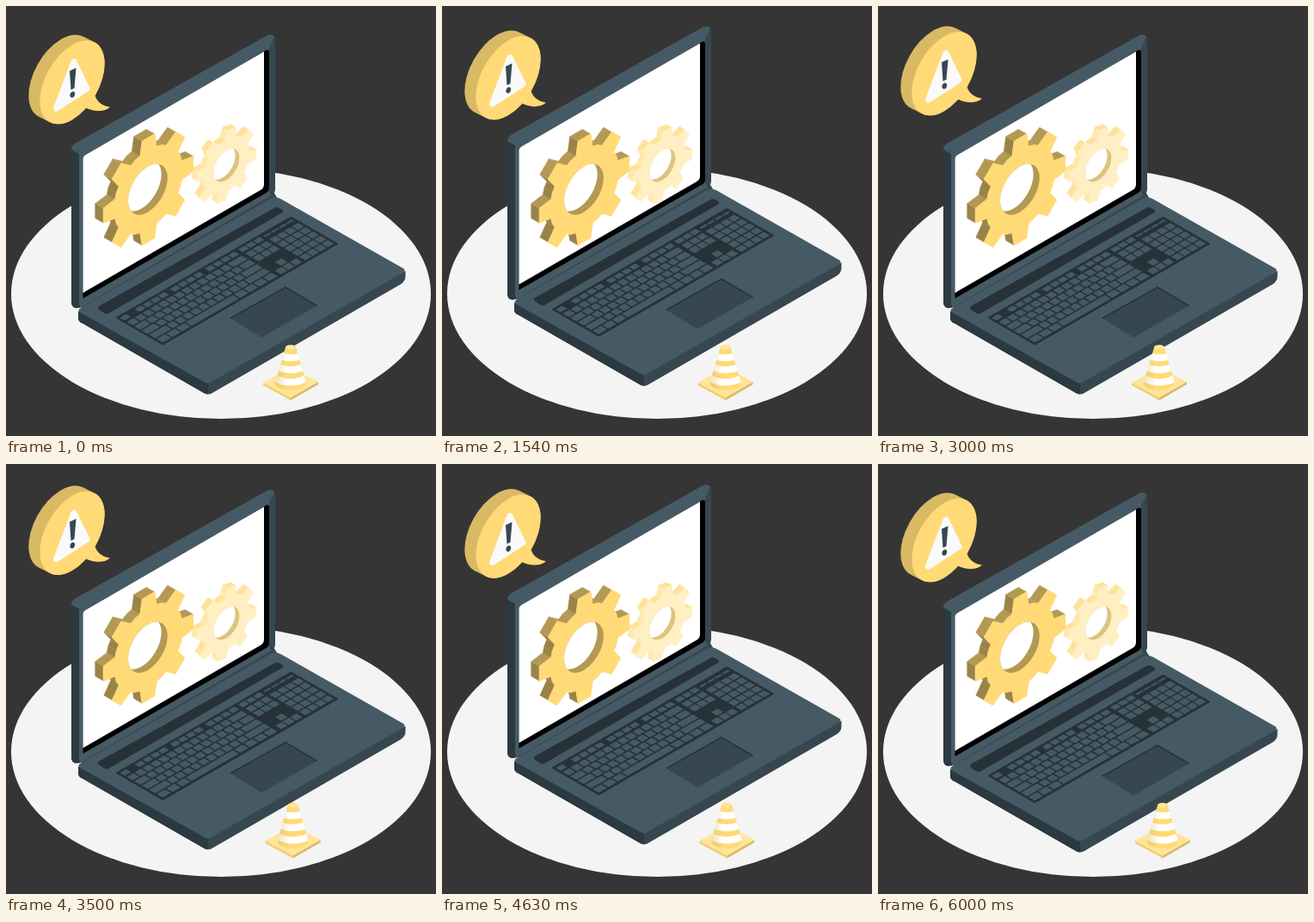
An HTML page for the animation above (6.04 s loop, 500x500 px).

```html
<!DOCTYPE html>
<html lang="en">
<head>
<meta charset="utf-8">
<title>Laptop maintenance</title>
<style>
html, body { margin: 0; width: 100%; height: 100%; overflow: hidden; background: #353535; }
svg { display: block; width: 100%; height: 100%; }
</style>
</head>
<body>
<svg viewBox="0 0 500 500">
  <defs>
    <linearGradient id="shade">
      <stop offset="0" stop-color="#d9b964" stop-opacity=".55"/>
      <stop offset=".4" stop-color="#d9b964" stop-opacity="0"/>
    </linearGradient>
    <clipPath id="coneClip">
      <path d="M325 397C325 393 337 393 337 397L349 438C349 450 313 450 313 438Z"/>
    </clipPath>
  </defs>

  <ellipse cx="250" cy="334.500" rx="244" ry="145.500" fill="#f4f4f4"/>

  <g id="laptop">
    <!-- lid -->
    <path d="M86 346L311 216L317 226L90 356Z" fill="#37474f"/>
    <path d="M76 167Q76 163 80 160L303 34.500Q313 30 313 40V213Q313 218 308 221L88 350Q76 354 76 344Z" fill="#37474f"/>
    <path d="M76 167Q76 163 80 160L303 34.500Q309 32 312 36L306 48V216L309 220L88 350Q85 350 85 346V172Z" fill="#455a64"/>
    <path d="M76 167L85 172V346Q85 350 88 350Q76 354 76 344Z" fill="#2b3940"/>
    <path d="M89.500 178V340L303 217Q306 215 306 211V54Q306 49 301 52Z" fill="#000"/>
    <path d="M89.500 178Q89.500 175 92 173.500L300 53V207Q300 212 296 214L89.500 333.500Z" fill="#fff"/>
    <!-- base -->
    <path d="M84 355V363Q84 367 89 369L231 450.500Q235 452.500 239 450.500L459 323.500Q464.500 320 464.500 314V308L235 400Z" fill="#37474f"/>
    <path d="M84 355V363Q84 367 89 369L231 450.500L235 451.500V430Z" fill="#2b3940"/>
    <path d="M89 350L308 224Q313 221 319 224L460 304Q467 307 460 311L239 437Q235 440 230 437L89 358Q80 354 89 350Z" fill="#455a64"/>
    <path d="M108 349L312 235Q315 233 318 235L322 237.500Q323 239 320 241L120 357Q117 359 114 357L108 353Q106 351 108 349Z" fill="#263238"/>
    <g id="keys" transform="matrix(.866 -.5 .866 .5 127 362.500)">
      <rect width="236" height="64" rx="2" fill="#263238"/>
    </g>
    <path d="M261 363L325 327L361.500 348.500L297 385.500Z" fill="#37474f"/>
    <path d="M261 363L325 327L361.500 348.500" fill="none" stroke="#263238" stroke-width="1.500"/>
  </g>

  <g id="gears"></g>

  <g id="bubble">
    <g transform="matrix(.866 -.5 0 1 77 88.700)">
      <path d="M0 0L-15 -14" stroke="#d9b964" stroke-width="87" stroke-linecap="round"/>
      <circle r="43.500" fill="#ffda76"/>
    </g>
    <path d="M103 102C105 111 111 116 121 117.500C115 123 103 124 92 118Z" fill="#ffda76"/>
    <path d="M79 65L58.500 119L94 96Z" fill="#fafafa" stroke="#fafafa" stroke-width="7" stroke-linejoin="round"/>
    <path d="M74 75.500L81.500 72L79.500 95.500L75.500 97.500Z" fill="#37474f"/>
    <ellipse cx="77.300" cy="103" rx="2.700" ry="3.600" fill="#37474f" transform="rotate(20 77.300 103)"/>
  </g>

  <g id="cone">
    <path d="M299 438L331 455V458.500L299 441Z" fill="#f0cf70"/>
    <path d="M363 437L331 455V458.500L363 440Z" fill="#d9b964"/>
    <path d="M299 438L331 420.500L363 437L331 455.500Z" fill="#ffe599"/>
    <g clip-path="url(#coneClip)">
      <rect x="308" y="390" width="46" height="62" fill="#ffda76"/>
      <g id="stripes" fill="none" stroke="#fff" stroke-width="8"></g>
      <rect x="310" y="390" width="42" height="62" fill="url(#shade)"/>
    </g>
    <ellipse cx="331" cy="397" rx="5.500" ry="2.600" fill="#ffe59f"/>
  </g>
</svg>

<script>
const $ = id => document.getElementById(id);

function add(parent, tag, attrs) {
  const el = document.createElementNS("http://www.w3.org/2000/svg", tag);
  for (const name in attrs) el.setAttribute(name, attrs[name]);
  parent.appendChild(el);
  return el;
}

// Keyboard, laid out flat and projected by its group
const PITCH = 10.4;

function key(u, v, w = PITCH, h = 8.2) {
  add($("keys"), "rect", { x: u, y: v, width: w - 1.8, height: h, rx: .8, fill: "#455a64" });
}

const ones = n => Array(n).fill(1);
const rows = [
  [...ones(13), 2],
  [1.5, ...ones(12), 1.5],
  [1.75, ...ones(11), 2.25],
  [2.25, ...ones(10), 2.75],
  [1.25, 1.25, 1.25, 6.25, 1.25, 1.25, 1.25, 1.25]
];

rows.forEach((row, r) => {
  const v = 12.5 + r * 10;
  let u = 3;
  for (const w of row) {
    key(u, v, w * PITCH);
    u += w * PITCH;
  }
  for (let c = 0; c < 3; c++) {
    if (r < 2 || r === 4 || (r === 3 && c === 1)) key(162 + c * 10, v);
  }
  for (let c = 0; c < 4; c++) key(194.5 + c * 10, v);
});

key(3, 3, PITCH, 6.5);
for (let i = 0; i < 12; i++) key(23 + i * 10.4 + Math.floor(i / 4) * 5.5, 3, PITCH, 6.5);
for (let c = 0; c < 3; c++) key(162 + c * 10, 3, PITCH, 6.5);
for (let c = 0; c < 4; c++) key(194.5 + c * 10, 4.5, PITCH, 2.5);

// Extruded gears standing in the plane of the screen
function outline(turn) {
  const pts = [];
  const at = (deg, r) => {
    const a = deg * Math.PI / 180;
    pts.push([r * Math.cos(a), r * Math.sin(a)]);
  };
  for (let mid = turn; mid < turn + 360; mid += 45) {
    at(mid - 14, 46);
    at(mid - 8, 61);
    at(mid + 8, 61);
    at(mid + 14, 46);
    at(mid + 22.5, 46.5);
  }
  return pts;
}

function gear(id, x, y, size, turn, { face, left, top, wall }) {
  const depth = 11;
  const g = add($("gears"), "g", {
    transform: `matrix(${.866 * size} ${-.5 * size} 0 ${size} ${x} ${y})`
  });
  const pts = outline(turn);
  pts.forEach(([ax, ay], i) => {
    const [bx, by] = pts[(i + 1) % pts.length];
    const dx = bx - ax, dy = by - ay;
    if (dx <= dy) return;
    const color = dx > -dy ? top : left;
    add(g, "path", {
      d: `M${ax} ${ay}L${bx} ${by}l${-depth} ${-depth}L${ax - depth} ${ay - depth}Z`,
      fill: color, stroke: color, "stroke-width": .4
    });
  });
  add(g, "path", {
    d: `M${pts.join("L")}Z`, fill: face, stroke: face,
    "stroke-width": 1, "stroke-linejoin": "round"
  });
  const rim = { cx: -.7, cy: -.7, r: 26.5 };
  add(g, "circle", { ...rim, fill: wall });
  add(add(g, "clipPath", { id }), "circle", rim);
  const hole = add(g, "g", { "clip-path": `url(#${id})` });
  add(hole, "circle", { cx: -9, cy: -9, r: 26.5, fill: "#fff" });
}

gear("smallHole", 256.7, 185.3, .655, 10,
  { face: "#ffefc2", left: "#ffe8ac", top: "#ffe29a", wall: "#dcc47f" });
gear("bigHole", 165.5, 213.5, 1, 0,
  { face: "#ffda76", left: "#998347", top: "#b39953", wall: "#b39953" });

for (const y of [409, 423, 437.5]) {
  add($("stripes"), "path", { d: `M308 ${y - 7}Q331 ${y + 7} 354 ${y - 7}` });
}

// Motion: [progress, offset] steps with linear travel between them
const FLOAT = [[0, 0], [.5, -10], [1, 0]];
const SHAKE = [[0, 0], [.1, -1], [.2, 2], [.3, -4], [.4, 4], [.5, -4],
  [.6, 4], [.7, -4], [.8, 2], [.9, -1], [1, 0]];
const LOOP = 6040, FPS = 24;

function sample(steps, p) {
  const i = Math.max(1, steps.findIndex(s => s[0] >= p));
  const [p0, v0] = steps[i - 1], [p1, v1] = steps[i];
  return v0 + (v1 - v0) * (p - p0) / (p1 - p0);
}

function move(id, x, y) {
  $(id).setAttribute("transform", `translate(${x} ${y})`);
}

const start = performance.now();

function draw() {
  const t = Math.max(0, performance.now() - start) % LOOP;
  const sec = Math.floor(t * FPS / 1000 + .1) / FPS;
  move("bubble", 0, sample(FLOAT, sec / 6 % 1));
  move("laptop", 0, sample(FLOAT, sec / 3 % 1));
  move("cone", sample(SHAKE, sec / 6 % 1), 0);
  requestAnimationFrame(draw);
}
draw();
</script>
</body>
</html>
```
